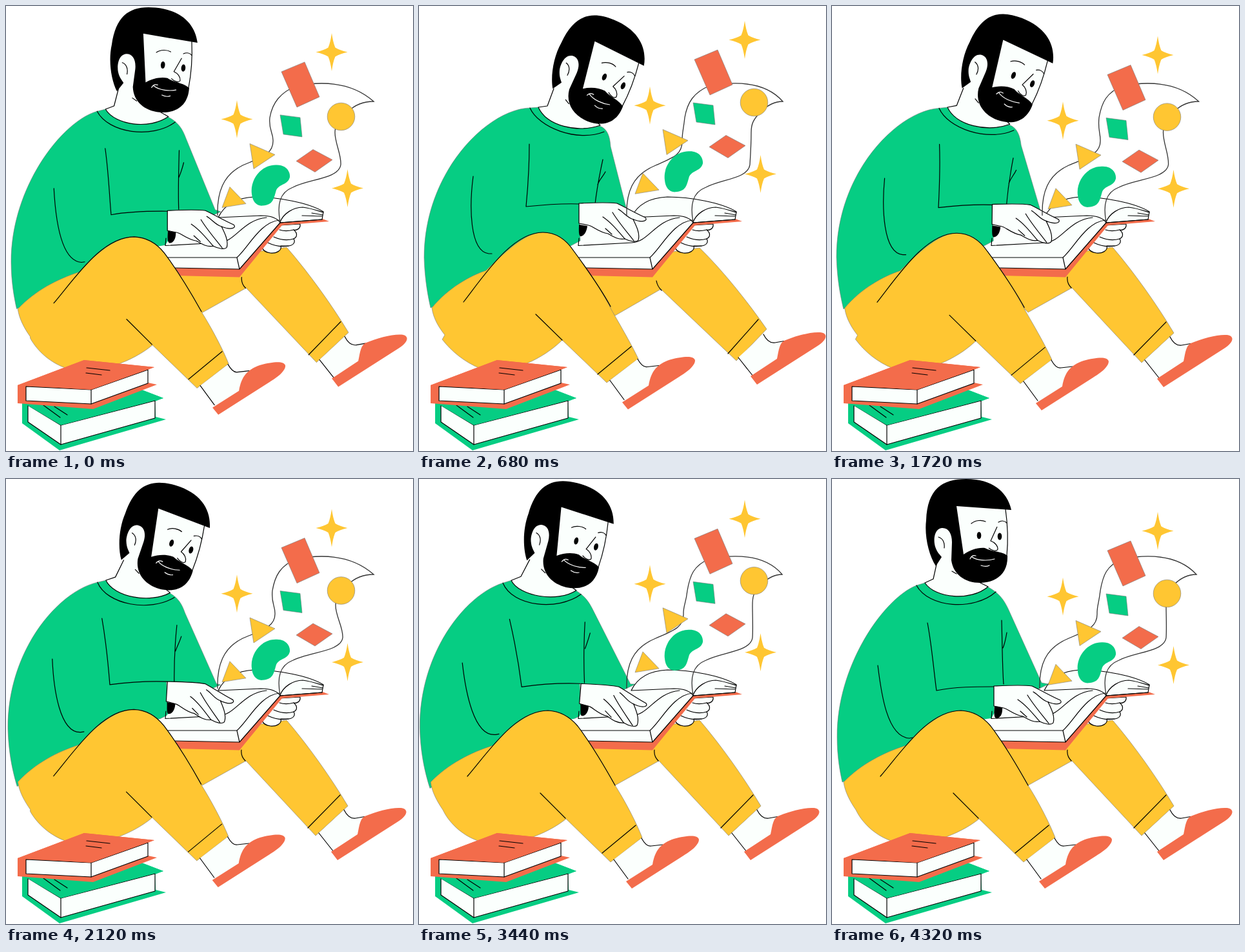
An HTML page that plays this animation: 631x690 px, repeating every 4.36 s.

```html
<!DOCTYPE html>
<html lang="en">
<head>
<meta charset="utf-8">
<title>Man reading a book</title>
<style>
  html, body { margin: 0; width: 100%; height: 100%; overflow: hidden; background: #fff; }
  svg { display: block; width: 631px; height: 690px; }
  path, circle, ellipse { stroke: none; }
  .line { fill: none; stroke: #000; stroke-width: 1.2; stroke-linecap: round; stroke-linejoin: round; }
  .skin { fill: #fbfffd; }
  .inked { fill: #fbfffd; stroke: #000; stroke-width: 1.2; stroke-linejoin: round; }
  .green { fill: #06cd83; }
  .yellow { fill: #ffc632; }
  .red { fill: #f36c4b; }
  .edge { stroke: #777; stroke-width: .6; }
  .ribbon { fill: none; stroke: #333; stroke-width: 1.3; }
  .lips { fill: none; stroke: #fff; stroke-width: 1.2; stroke-linecap: round; }
</style>
</head>
<body>
<svg viewBox="0 0 631 690">
  <!-- far leg -->
  <path id="farLeg" class="yellow edge"/>
  <path id="farLines" class="line"/>
  <g id="farFoot">
    <path class="skin" d="M485 549L508 580L547 553C550 535 553 528 558 523L544 526C537 528 530 524 524 513Z"/>
    <path class="line" d="M485 549L508 578M524 513C530 525 536 527 542 526L556 523.5"/>
    <path class="red" d="M504 578L545 551C548 536 549 527 556 523C575 515 598 509 612 510C624 511 624 521 608 531L514 591Z"/>
  </g>

  <!-- torso -->
  <path id="torso" class="green edge"/>
  <path id="neck" class="skin"/>
  <path id="torsoLines" class="line"/>

  <g id="head">
    <path class="skin" d="M193 42L270 46C274 75 273 100 271 122L230 130L172 125C160 112 155 95 158 84C162 74 180 72 187 90Z"/>
    <path class="line" d="M269 47C273 75 273 98 271 119"/>
    <path d="M161 135C150 118 143 88 146 64C148 16 170 0 208 0C250 0 272 21 278 48L193 42L204 117C214 110 226 106 237 107C248 113 264 112 272 119C273 146 256 160 230 161C206 161 188 148 185 126L186 98C186 84 180 75 170 76C158 78 157 95 160 105C163 114 167 117 170 121Z"/>
    <path class="inked" d="M256 74L246 96C252 98 257 103 257 109C255 113 248 111 243 107"/>
    <path class="line" d="M165 90C172 92 175 99 174 107M216 69C222 64 232 63 238 66M258 67C263 64 268 65 271 68M186 143L193 147"/>
    <ellipse cx="228" cy="87.5" rx="3.3" ry="5.6"/>
    <ellipse cx="260" cy="89" rx="3.3" ry="5.6"/>
    <path class="lips" d="M214 124C216 119 219 118 223 119M217 121C226 127 242 127 252 124M231 134C236 136 240 136 244 134"/>
  </g>

  <!-- open book and the hand behind it -->
  <path class="inked" d="M424 340L456 338C457 346 450 348 446 347C452 352 452 358 446 361C449 366 446 371 438 372L426 372C428 380 418 384 410 383C402 382 398 378 397 374Z"/>
  <path class="line" d="M446 347C438 349 430 349 424 347M446 361C436 364 424 362 415 358M438 372C426 374 414 371 406 367"/>
  <path class="red" d="M252 400L262 418L362 420.5L428 340L501 334L488 329L425 336L362 408Z"/>
  <path class="skin" d="M225 374L247 371L262 345L329 328L395 325C410 325 420 328 425 336L362 408L255 406Z"/>
  <path class="inked" d="M329 328C340 305 362 297 385 296C420 296 470 305 492 319L490 331L425 336C420 328 410 325 395 325Z"/>
  <path class="line" d="M425 335C430 322 445 312 460 312C475 314 485 318 492 320M474 321L491 324M459 325L490 326M425 336L490 331M240 390L358 390L362 408L258 406M362 408L425 336M358 390C376 374 394 335 424 332M248 360L247 371.5L330 367C356 366 366 332 404 328"/>

  <path id="cuff"/>
  <g id="hand">
    <path class="inked" d="M251 321C275 320 295 319 310 321C325 328 338 336 354 343C358 348 350 350 342 348L335 346C340 356 346 368 343 378C340 382 330 380 322 376C312 378 303 372 296 368C282 366 272 356 266 355L251 352Z"/>
    <path class="line" d="M312 330C322 336 326 344 336 346M303 335C312 350 326 366 336 379M288 342C300 350 310 362 322 376M292 360L302 369"/>
  </g>

  <!-- near leg -->
  <path id="nearLeg" class="yellow edge"/>
  <path id="nearLines" class="line"/>
  <g id="nearFoot">
    <path class="skin" d="M302 590L325 622L364 597C368 578 374 570 382 566L358 569C350 567 347 560 345 557Z"/>
    <path class="line" d="M302 590L324 620M345 557C350 566 355 570 360 569L378 567"/>
    <path class="red" d="M321 624L362 598C366 575 375 565 395 558C415 553 432 551 434 559C434 568 420 578 410 584L330 635Z"/>
  </g>

  <!-- stack of books -->
  <path class="green" d="M25 616L25 647L83 689L248 641L232 637L231 613L244 608L205 593Z"/>
  <path class="inked" d="M34 619L85 650L231 612L231 639L85 680L34 645Z"/>
  <path class="green" d="M28 616L85 650L244 608L205 593Z"/>
  <path class="line" d="M85 650V680M58 619L84 638M75 621L95 634"/>
  <path class="red" d="M18 588L18 616L135 625L234 587L220 584L220 564L230 560L121 549Z"/>
  <path class="inked" d="M31 590L132 595L220 564L220 585L132 617L31 612Z"/>
  <path class="red" d="M18 588L121 549L230 560L132 595Z"/>
  <path class="line" d="M132 595V617M125 561L161 565M124 569L148 572"/>

  <!-- things rising from the pages -->
  <path id="ribbon" class="ribbon"/>
  <defs><path id="star" d="M0 -29.5Q2 -15 5.5 -7Q12 -3 24.5 0Q12 3 5.5 7Q2 15 0 29.5Q-2 15 -5.5 7Q-12 3 -24.5 0Q-12 -3 -5.5 -7Q-2 -15 0 -29.5Z"/></defs>
  <g id="floatA">
    <use href="#star" x="505" y="71.5" class="yellow"/>
    <path class="red edge" d="M427 102L463 87L486 141L451 157Z"/>
    <path class="green edge" d="M425 169L456 173L459 203L430 199Z"/>
  </g>
  <g id="floatB">
    <use href="#star" x="358" y="176" class="yellow"/>
    <path class="green" d="M381 292C378 270 395 247 418 247C435 246 441 258 440 266C437 278 424 276 419 286C415 300 414 309 398 310C388 311 382 303 381 292Z"/>
    <path class="yellow edge" d="M347 281L372 307L335 313Z"/>
  </g>
  <g id="floatC">
    <use href="#star" x="529.5" y="283" class="yellow"/>
    <path class="red edge" d="M450 241L476 223L506 239L479 258Z"/>
    <path class="yellow edge" d="M378 214L417 231L384 253Z"/>
    <circle class="yellow edge" cx="519.5" cy="172" r="21.3"/>
  </g>
</svg>
<script>
const LOOP = 4360, STEP = 40;
const el = id => document.getElementById(id);
const place = (id, x, y, turn = '') => el(id).setAttribute('transform', `translate(${x} ${y}) ${turn}`);
const ease = (t, from, to) => {
  const u = Math.min(1, Math.max(0, (t - from) / (to - from)));
  return u * u * (3 - 2 * u);
};
const blend = (values, weights) => values.reduce((sum, v, i) => sum + v * weights[i], 0);

// Outlines per pose; poses of one part share the same commands.
// Torso poses: upright, forward, leaning back.
const torsoPoses = {
  torso: [
    'M131 165C80 185 7 290 8 400C8 430 12 452 16 470C50 455 85 440 115 425L200 400L238 374L252 371L251 321L300 335L336 318L325 316L273 201C266 186 258 176 241 167C215 190 160 185 144 161Z',
    'M172 158C106 160 8 257 8 390C9 425 14 450 18 468C50 452 82 437 110 422L200 400L235 372L250 364L248 307L300 330L324 322L322 316L297 218C296 202 292 190 280 186C245 195 195 180 186 157Z',
    'M130 161C70 180 0 270 1 385C2 425 9 455 17 480C50 460 85 440 118 425L200 400L236 374L252 366L249 317L300 335L336 318L328 318L270 204C264 192 258 182 243 173C215 190 155 180 143 157Z'
  ],
  neck: [
    'M172 115L161 133L157 155L144 161C160 185 215 190 242 167L228 155L220 120Z',
    'M222 110L209 128L199 155L185 157C198 186 245 197 281 185L275 178L265 130Z',
    'M181 108L170 128L158 151L143 157C155 182 215 192 244 173L236 165L225 120Z'
  ],
  torsoLines: [
    'M163 128L157 155L144 161C160 185 215 190 242 167L228 160M131 165C150 200 220 205 254 175M71 289C76 330 85 400 120 402L125 401M148 223C155 260 158 300 162 328C190 322 225 322 251 322M263 219C264 255 264 290 266 318M271 238C269 250 268 255 265 262',
    'M209 128L199 155L185 157C198 186 245 197 281 185L275 179M172 158C185 188 245 212 287 195M84 264C78 310 78 380 108 384L113 384M171 214C171 250 168 290 166 311C195 308 225 306 249 307M285 238C278 270 275 290 273 307M289 257C285 265 280 268 277 277',
    'M172 125L158 151L143 157C155 182 215 192 244 173L236 167M130 161C145 198 215 205 251 179M67 285C72 330 85 400 119 396L124 395M140 217C150 260 155 290 159 322C195 317 225 316 250 317M257 222C255 255 255 290 256 316M265 239C262 250 260 255 257 263'
  ],
  cuff: [
    'M252 352L264 354C265 365 260 372 254 371C250 368 252 360 252 352Z',
    'M248 339L261 341C260 350 256 357 250 357C247 355 248 345 248 339Z',
    'M250 349L263 351C263 361 258 368 252 367C249 365 251 357 250 349Z'
  ]
};
// Leg poses: resting, raised.
const nearPoses = {
  nearLeg: [
    'M18 470C45 442 80 424 115 413L135 392C165 365 185 359 200 359C220 360 235 370 246 383C270 415 290 450 304 475C320 500 338 535 346 556L297 594L228 527C200 550 140 575 95 562C70 555 48 535 38 515L37 513C28 500 20 485 18 470Z',
    'M20 468C45 437 80 418 104 410L125 390C155 362 175 351 192 351C212 351 228 362 240 380C265 412 285 445 300 474C318 505 332 530 340 547L291 584L222 518C195 545 140 575 95 562C70 552 50 535 36 517L40 510C32 500 22 485 20 468Z'
  ],
  nearLines: [
    'M75 461C110 420 150 359 200 359C220 360 235 370 246 383C268 412 290 450 304 475M188 487L227 526M284 580L336 537',
    'M69 459C103 415 145 351 192 351C212 351 228 362 240 380C262 410 284 442 297 466M181 478L222 518M277 571L329 528'
  ]
};
const farPoses = {
  farLeg: [
    'M262 400L435 374C470 415 505 465 530 507L480 553L372 437L304 475L250 420Z',
    'M262 400L435 375C473 412 512 462 539 501L492 550L375 439L304 480L250 420Z'
  ],
  farLines: [
    'M365 420C364 428 367 433 371 437M468 541L518 490',
    'M368 426C369 432 372 437 376 441M479 539L526 486'
  ]
};
// Ribbon bends: x of start, left bulge, left waist, right waist, right bulge, tip.
const ribbonTimes = [0, 680, 1320, 2120, 2800, 3440, 4320];
const ribbonBends = [
  [328, 414, 409, 510, 519, 570], [322, 408, 412, 515, 513, 564],
  [324, 415, 415, 516, 521, 567], [328, 417, 413, 511, 522, 570],
  [328, 413, 408, 511, 517, 569], [322, 410, 416, 517, 517, 563],
  [322, 411, 416, 518, 518, 565]
];

const numbers = /-?[\d.]+/g;
function shape(poses, weights) {
  for (const [id, paths] of Object.entries(poses)) {
    const sets = paths.map(p => p.match(numbers).map(Number));
    let i = 0;
    const d = paths[0].replace(numbers, () => {
      const n = i++;
      return ' ' + blend(sets.map(s => s[n]), weights).toFixed(2);
    });
    el(id).setAttribute('d', d);
  }
}

function drawRibbon(t) {
  let i = 0;
  while (i < ribbonTimes.length - 2 && t >= ribbonTimes[i + 1]) i++;
  const u = ease(t, ribbonTimes[i], ribbonTimes[i + 1]);
  const [start, bulge, waist, inner, outer, tip] =
    ribbonBends[i].map((v, k) => v + (ribbonBends[i + 1][k] - v) * u);
  el('ribbon').setAttribute('d',
    `M${start} 325C${start - 1} 290 ${start + 8} 262 367 247
     C395 235 ${bulge + 1} 230 ${bulge} 208C${bulge} 196 ${waist - 2} 192 ${waist} 173
     C${waist + 4} 150 425 134 452 123M470 121C510 117 543 124 ${tip} 148
     C552 148 540 154 530 164C518 176 ${inner} 183 ${inner} 196
     C${inner} 213 ${outer + 1} 230 ${outer} 246C${outer - 3} 268 470 268 445 281C424 289 420 308 425 335`);
}

function draw(t) {
  const forward = ease(t, -310, 640), back = ease(t, 1490, 2460), upright = ease(t, 3310, 4290);
  const weights = [1 - forward + upright, forward - back, back - upright];
  shape(torsoPoses, weights);

  // The head swings along a shallow arc.
  const headX = blend([193, 272.5, 222], weights);
  const headY = 42 + (headX - 193) ** 2 / 500;
  place('head', headX, headY, `rotate(${blend([0, 22.5, 14.5], weights)}) translate(-193 -42)`);
  place('hand', blend([0, -3, -1], weights), blend([0, -15, -4], weights), `rotate(${5 * weights[2]} 250 335)`);

  const near = ease(t, -200, 640) - ease(t, 1500, 2380);
  shape(nearPoses, [1 - near, near]);
  place('nearFoot', -6 * near, -9.5 * near);

  const far = ease(t, -160, 600) - ease(t, 960, 1680);
  shape(farPoses, [1 - far, far]);
  place('farFoot', 10 * far, -4 * far);

  const float = (id, base, lag, fall) => place(id, 0, base
    - 28 * ease(t, -370 + lag, 600 + lag) + 23.5 * ease(t, fall, fall + 720)
    - 15.5 * ease(t, 2150 + lag, 2830 + lag) + 20 * ease(t, 3290 + lag, 4260 + lag / 2));
  float('floatA', 9, 0, 840);
  float('floatB', 6.3, 60, 985);
  float('floatC', 5.5, 80, 1080);

  drawRibbon(t);
}

function tick() {
  const t = performance.now() % LOOP;
  draw(Math.floor(t / STEP) * STEP);
  requestAnimationFrame(tick);
}
tick();
</script>
</body>
</html>
```
